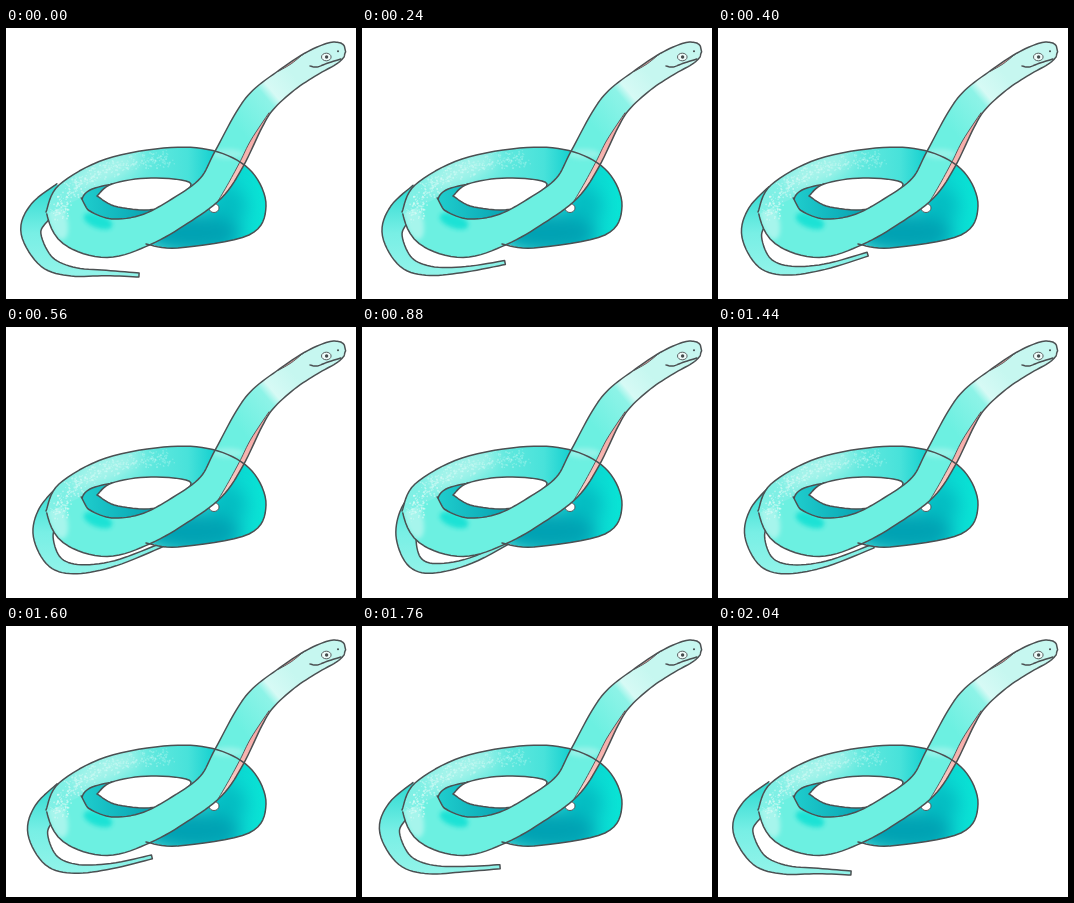
An HTML page for the animation above (2400 ms loop, 350 px wide and 271 px high).

```html
<!DOCTYPE html>
<html lang="en">
<head>
<meta charset="utf-8">
<title>Snake</title>
<style>
  html, body { margin: 0; width: 100%; height: 100%; overflow: hidden; background: #fff; }
  svg { display: block; width: 350px; height: 271px; }
  .ink { stroke: #4b5052; stroke-width: 1.5; stroke-linejoin: round; stroke-linecap: round; }
  .thin { stroke: #4b5052; stroke-width: .9; }
  .line { fill: none; }
</style>
</head>
<body>
<svg viewBox="0 0 350 271">
  <defs>
    <linearGradient id="coilFill" gradientUnits="userSpaceOnUse" x1="40" y1="0" x2="262" y2="0">
      <stop offset="0" stop-color="#82f1e6"/>
      <stop offset=".4" stop-color="#6aebe0"/>
      <stop offset=".64" stop-color="#48e2da"/>
      <stop offset=".78" stop-color="#0ccdce"/>
      <stop offset="1" stop-color="#08e6d6"/>
    </linearGradient>
    <linearGradient id="bodyFill" gradientUnits="userSpaceOnUse" x1="330" y1="18" x2="232" y2="100">
      <stop offset="0" stop-color="#c6f7f0"/>
      <stop offset=".4" stop-color="#c6f7f0"/>
      <stop offset=".61" stop-color="#d6faf5"/>
      <stop offset=".68" stop-color="#8df3e7"/>
      <stop offset="1" stop-color="#6cf0e1"/>
    </linearGradient>
    <linearGradient id="tailFill" gradientUnits="userSpaceOnUse" x1="0" y1="165" x2="0" y2="245">
      <stop offset="0" stop-color="#38ddd4"/>
      <stop offset=".5" stop-color="#78efe5"/>
      <stop offset="1" stop-color="#90f3e9"/>
    </linearGradient>
    <linearGradient id="bellyFill" gradientUnits="userSpaceOnUse" x1="0" y1="86" x2="0" y2="176">
      <stop offset="0" stop-color="#f5a3a2"/>
      <stop offset=".5" stop-color="#f7b5b0"/>
      <stop offset="1" stop-color="#fbdcd5"/>
    </linearGradient>
    <linearGradient id="innerFill" gradientUnits="userSpaceOnUse" x1="76" y1="0" x2="150" y2="0">
      <stop offset="0" stop-color="#1fcdcd"/>
      <stop offset="1" stop-color="#06a0b0"/>
    </linearGradient>
    <filter id="soft" x="-50%" y="-50%" width="200%" height="200%"><feGaussianBlur stdDeviation="8"/></filter>
    <filter id="blur" x="-50%" y="-50%" width="200%" height="200%"><feGaussianBlur stdDeviation="2"/></filter>
    <clipPath id="coilClip"><path data-shape="coil"/></clipPath>
    <clipPath id="bodyClip"><path data-shape="body"/></clipPath>
  </defs>

  <path id="tail" class="ink" fill="url(#tailFill)"/>

  <path data-shape="coil" fill="url(#coilFill)"/>
  <g clip-path="url(#coilClip)">
    <g filter="url(#soft)">
      <ellipse cx="186" cy="205" rx="48" ry="20" fill="#02a2b3"/>
      <ellipse cx="224" cy="178" rx="16" ry="18" fill="#06b4bd" opacity=".7"/>
      <ellipse cx="100" cy="142" rx="38" ry="13" fill="#cff8f2" opacity=".6" transform="rotate(-25 100 142)"/>
    </g>
  </g>
  <path data-shape="inner" class="ink" fill="url(#innerFill)"/>
  <path data-shape="hole" class="ink" fill="#fff"/>
  <ellipse cx="208" cy="180" rx="5" ry="4.5" class="thin" fill="#fff"/>

  <path data-shape="body" fill="url(#bodyFill)"/>
  <g clip-path="url(#bodyClip)">
    <ellipse cx="92" cy="193" rx="15" ry="7" fill="#1fe2d5" filter="url(#blur)" transform="rotate(20 92 193)"/>
    <ellipse cx="52" cy="192" rx="9" ry="20" fill="#a6f5ec" filter="url(#blur)" transform="rotate(-15 52 192)"/>
    <ellipse cx="222" cy="126" rx="16" ry="5" fill="#94f3e8" filter="url(#blur)"/>
    <path data-shape="belly" class="thin" fill="url(#bellyFill)"/>
    <path data-shape="hood" class="thin" fill="#f5a9a6"/>
  </g>
  <g id="specks" fill="#d6faf5" clip-path="url(#coilClip)"></g>
  <path data-shape="coilLine" class="ink line"/>
  <path data-shape="body" class="ink line"/>

  <path data-shape="mouth" class="ink line"/>
  <ellipse cx="320.3" cy="29" rx="4.8" ry="3.8" fill="#effcfa" class="thin"/>
  <circle cx="320.6" cy="29" r="1.7" fill="#454b4d"/>
  <circle cx="332" cy="23.2" r="1" fill="#454b4d"/>
</svg>
<script>
  const mix = (a, b, t) => a + (b - a) * t;

  // Point on a smooth curve through key points; u runs from 0 to the last index.
  function along(keys, u) {
    const i = Math.min(Math.floor(u), keys.length - 2), t = u - i;
    const key = k => keys[Math.max(0, Math.min(keys.length - 1, k))];
    const [a, b, c, d] = [key(i - 1), key(i), key(i + 1), key(i + 2)];
    return b.map((v, k) => v + t / 2 * (c[k] - a[k]
      + t * (2 * a[k] - 5 * v + 4 * c[k] - d[k] + t * (3 * (v - c[k]) + d[k] - a[k]))));
  }

  const STEPS = 8;
  function sample(keys) {
    const count = (keys.length - 1) * STEPS;
    return Array.from({ length: count + 1 }, (_, i) => along(keys, i / STEPS));
  }

  const path = points => 'M' + points.map(p => p.map(v => v.toFixed(2))).join('L');
  const curve = keys => path(sample(keys));
  const loop = keys => curve([...keys, keys[0]]) + 'Z';

  // Outline around a spine of [x, y, half width], open at its first end.
  function ribbon(spine) {
    const mid = sample(spine), left = [], right = [];
    mid.forEach(([x, y, r], i) => {
      const a = mid[Math.max(0, i - 1)], b = mid[Math.min(mid.length - 1, i + 1)];
      const dx = b[0] - a[0], dy = b[1] - a[1], k = r / Math.hypot(dx, dy);
      left.push([x + dy * k, y - dx * k]);
      right.unshift([x - dy * k, y + dx * k]);
    });
    return path([...left, ...right]);
  }

  const coil = [[40, 184], [53, 157], [100, 131], [165, 119.5], [212, 124], [246, 144],
    [260, 178], [243, 207], [172, 220], [140, 216]];
  const shapes = {
    coil: loop([...coil, [70, 208]]),
    coilLine: curve(coil),
    inner: loop([[106, 156], [84, 162], [76, 173], [84, 190], [115, 196], [152, 184]]),
    hole: loop([[91, 168], [106, 156], [145, 150], [185, 156], [154, 180], [112, 179]]),
    body: ribbon([[58, 178, 19], [70, 199, 21], [102, 210, 19.5], [139, 202, 15.5], [174, 183, 14.5],
      [205, 160, 14.5], [223, 131, 16], [243, 92, 15], [257, 72, 14], [281, 52, 12.5],
      [305, 36, 12.5], [325, 26, 11.5], [335, 22, 8], [339, 21, 3]]),
    belly: ribbon([[264, 85, 1], [249, 114, 4.5], [239, 135, 5], [226, 157, 4], [212, 175, 1]]),
    hood: ribbon([[272, 43, .5], [284, 33, 3], [299, 24, .5]]),
    mouth: curve([[304, 38], [311, 39], [322, 35], [335, 31]])
  };
  for (const el of document.querySelectorAll('[data-shape]'))
    el.setAttribute('d', shapes[el.dataset.shape]);

  // Grainy highlight from the left bend over the back of the coil.
  let seed = 7;
  const rand = () => (seed = seed * 16807 % 2147483647) / 2147483647;
  const ridge = [[52, 186], [70, 158], [108, 139], [165, 129]];
  let dots = '';
  for (let i = 0; i < 420; i++) {
    const u = rand(), [x, y] = along(ridge, 3 * u);
    const shift = () => 11 * (rand() + rand() - 1);
    dots += `<circle cx="${(x + shift()).toFixed(1)}" cy="${(y + shift()).toFixed(1)}"`
      + ` r="${mix(.4, 1.1, rand()).toFixed(2)}" opacity="${mix(.7, .25, u).toFixed(2)}"/>`;
  }
  document.getElementById('specks').innerHTML = dots;

  // Tail spine stretched out and tucked under the body.
  const out = [[58, 166], [34, 184], [25, 205], [40, 233], [66, 243.5], [100, 245], [133, 247]];
  const tucked = [[62, 170], [50, 190], [46, 212], [54, 235], [75, 241], [116, 230], [173, 197]];
  const LOOP = 2400, TURN = 960, REST = 2000;

  // Steady pull in, eased swing back, then a rest.
  function tuck(t) {
    if (t < TURN) return t / TURN;
    const u = Math.min(1, (t - TURN) / (REST - TURN));
    return (1 + Math.cos(Math.PI * u)) / 2;
  }

  function tailSpine(q) {
    return out.map(([x, y], i) => {
      const taper = (1 + Math.cos(Math.PI * i / (out.length - 1))) / 2;
      return [mix(x, tucked[i][0], q), mix(y, tucked[i][1], q), 2 + 10.5 * taper];
    });
  }

  const tail = document.getElementById('tail');
  const start = performance.now();
  function draw() {
    const t = Math.max(0, performance.now() - start) % LOOP;
    tail.setAttribute('d', ribbon(tailSpine(tuck(Math.floor(t / 40) * 40))));
    requestAnimationFrame(draw);
  }
  draw();
</script>
</body>
</html>
```
